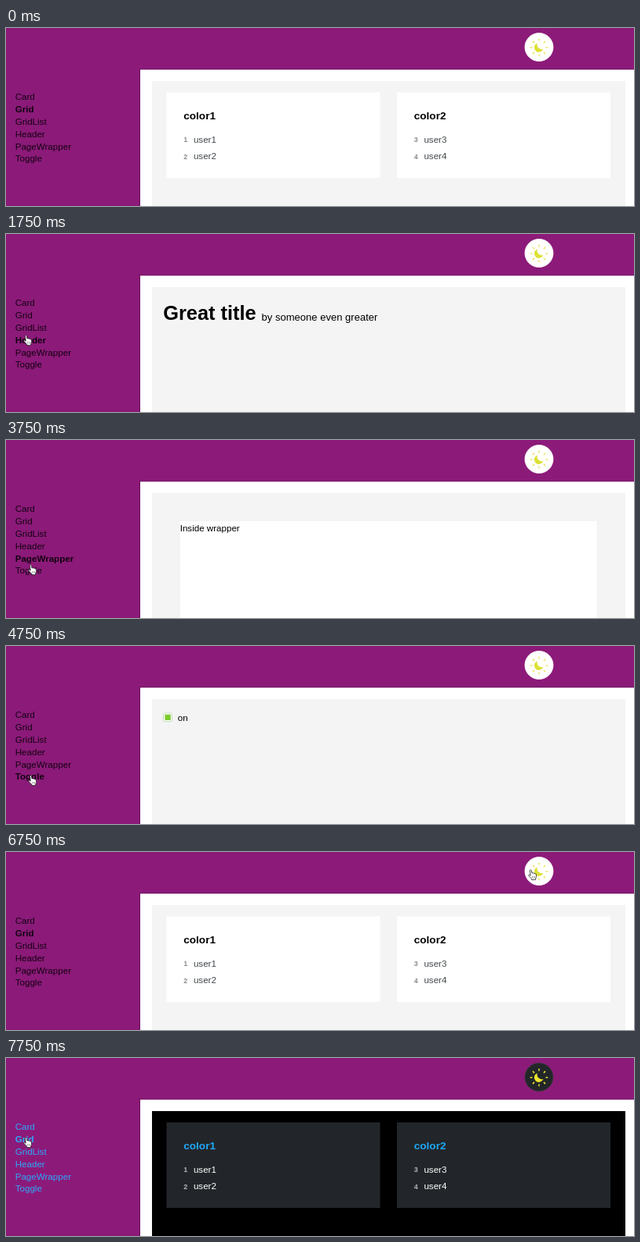
An HTML page for the animation above (8000 ms loop, 800x228 px).

```html
<!DOCTYPE html>
<html lang="en">
<head>
<meta charset="utf-8">
<title>Component demo</title>
<style>
  html, body { margin: 0; width: 100%; height: 100%; overflow: hidden; background: #fff; }
  svg { display: block; width: 100vw; height: 100vh; font-family: "Liberation Sans", Arial, sans-serif; }
</style>
</head>
<body>
<svg id="stage" viewBox="0 0 800 228"></svg>
<script>
const LOOP = 8000, STEP = 250;
const PURPLE = '#8c1a79';
const MENU = ['Card', 'Grid', 'GridList', 'Header', 'PageWrapper', 'Toggle'];

const LIGHT = { panel: '#f4f4f4', card: '#fff', title: '#000', menu: '#120310', user: '#43484b',
  num: '#8c8c8c', disc: '#fff', rim: '#fff', moon: '#dde135', ray: '#ebe46a' };
const DARK = { panel: '#000', card: '#22262a', title: '#1fa9f8', menu: '#2ea8fb', user: '#fff',
  num: '#b4b4b4', disc: '#232629', rim: '#3d3a3d', moon: '#ece52f', ray: '#ece52f' };

// [start time, page]
const PAGES = [[0, 'Grid'], [500, 'GridList'], [1750, 'Header'], [3250, 'PageWrapper'],
  [4500, 'Toggle'], [6000, 'Grid']];
const DARK_FROM = 7000, CURSOR_FROM = 250;

// [time, x, y] of the pointer
const PATH = [[250, 18, 104], [750, 14, 113], [1250, 14, 113], [1750, 22, 129], [2000, 22, 130],
  [2500, 27, 148], [3250, 27, 148], [3750, 28, 159], [4250, 28, 165], [5000, 28, 165],
  [5750, 22, 88], [6000, 22, 99], [6250, 22, 100], [6750, 665, 22], [7250, 665, 22], [7750, 22, 101]];

const rect = (x, y, w, h, fill, extra = '') =>
  `<rect x="${x}" y="${y}" width="${w}" height="${h}" fill="${fill}" ${extra}/>`;
const text = (x, y, size, fill, str, bold) =>
  `<text x="${x}" y="${y}" font-size="${size}" fill="${fill}" font-weight="${bold ? 700 : 400}">${str}</text>`;

function card(x, w, title, first, c) {
  let out = rect(x, 82.5, w, 109.5, c.card) + text(x + 21.7, 117, 13.6, c.title, title, true);
  for (let i = 0; i < 2; i++) {
    const n = first + i, y = 146.5 + i * 21.7;
    out += text(x + 21.7, y - 0.7, 9, c.num, n, true) + text(x + 34.4, y, 11.6, c.user, 'user' + n);
  }
  return out;
}

const views = {
  Grid: c => card(204.5, 272, 'color1', 1, c) + card(498, 272, 'color2', 3, c),
  GridList: c => card(200, 574, 'color1', 1, c) + rect(200, 213.5, 574, 15, c.card),
  Header: c => text(200.2, 110, 25.4, c.title, 'Great title', true) +
    text(325.5, 111, 13.05, c.title, 'by someone even greater'),
  PageWrapper: c => rect(222, 104, 530.5, 124, c.card) + text(221.7, 116.5, 11.6, c.title, 'Inside wrapper'),
  Toggle: c => rect(200.5, 86, 11, 10.8, '#fff', 'rx="2.2" stroke="#c3d9b4"') +
    rect(202.4, 87.8, 7.4, 7.2, '#7ccb2e') + text(218.7, 95.6, 11.6, c.title, 'on')
};

function themeButton(c) {
  let rays = '';
  for (let i = 0; i < 8; i++)
    rays += `<path d="M0-9V-10.8" transform="rotate(${i * 45})"/>`;
  return `<circle cx="679" cy="24.5" r="18" fill="${c.disc}" stroke="${c.rim}" stroke-width=".8"/>
    <g transform="translate(679 25)">
      <g stroke="${c.ray}" stroke-width="1.5" stroke-linecap="round">${rays}</g>
      <path d="M-2.1-5.6A5.9 5.9 0 1 0 5.4 1.9A6 6 0 0 1-2.1-5.6Z" fill="${c.moon}"/>
    </g>`;
}

function hand([x, y]) {
  return `<path transform="translate(${x} ${y})" fill="#fff" stroke="#222" stroke-width=".8" stroke-linejoin="round"
    d="M2.4 1.5Q3.3 0 4.3 1.5L5 5Q6.3 4.2 7 5.2Q8.2 4.7 8.8 5.7Q10.3 5.5 10.5 7V9.5Q10.4 11 9.6 12V13.6H4.6V12.2L1 8.6Q.2 7.3 1.4 7L3.2 8.2Z"/>
    <path transform="translate(${x} ${y})" d="M5.6 9V11.6M7.1 9V11.6M8.6 9V11.6" stroke="#555" stroke-width=".5"/>`;
}

function pointerAt(t) {
  const i = PATH.findIndex(p => p[0] >= t);
  if (i <= 0) return PATH[0].slice(1);
  const [t0, x0, y0] = PATH[i - 1], [t1, x1, y1] = PATH[i];
  const k = (t - t0) / (t1 - t0);
  return [x0 + (x1 - x0) * k, y0 + (y1 - y0) * k];
}

function scene(t) {
  const c = t >= DARK_FROM ? DARK : LIGHT;
  const page = PAGES.filter(p => p[0] <= t).pop()[1];
  return rect(0, 0, 800, 228, PURPLE) +
    rect(170.4, 52.8, 640, 190, 'none', 'stroke="#000" stroke-opacity=".22"') +
    rect(171, 53.4, 629, 175, '#fff') +
    rect(186, 68, 603, 160, c.panel) +
    MENU.map((m, i) => text(11.7, 92 + i * 15.88, 11.6, c.menu, m, m === page)).join('') +
    views[page](c) + themeButton(c) +
    (t >= CURSOR_FROM ? hand(pointerAt(t)) : '');
}

const stage = document.getElementById('stage');
const start = performance.now();
let shown = -1;

function tick(now) {
  const t = Math.floor((Math.max(0, now - start) % LOOP) / STEP) * STEP;
  if (t !== shown) {
    stage.innerHTML = scene(t);
    shown = t;
  }
  requestAnimationFrame(tick);
}
tick(start);
</script>
</body>
</html>
```
